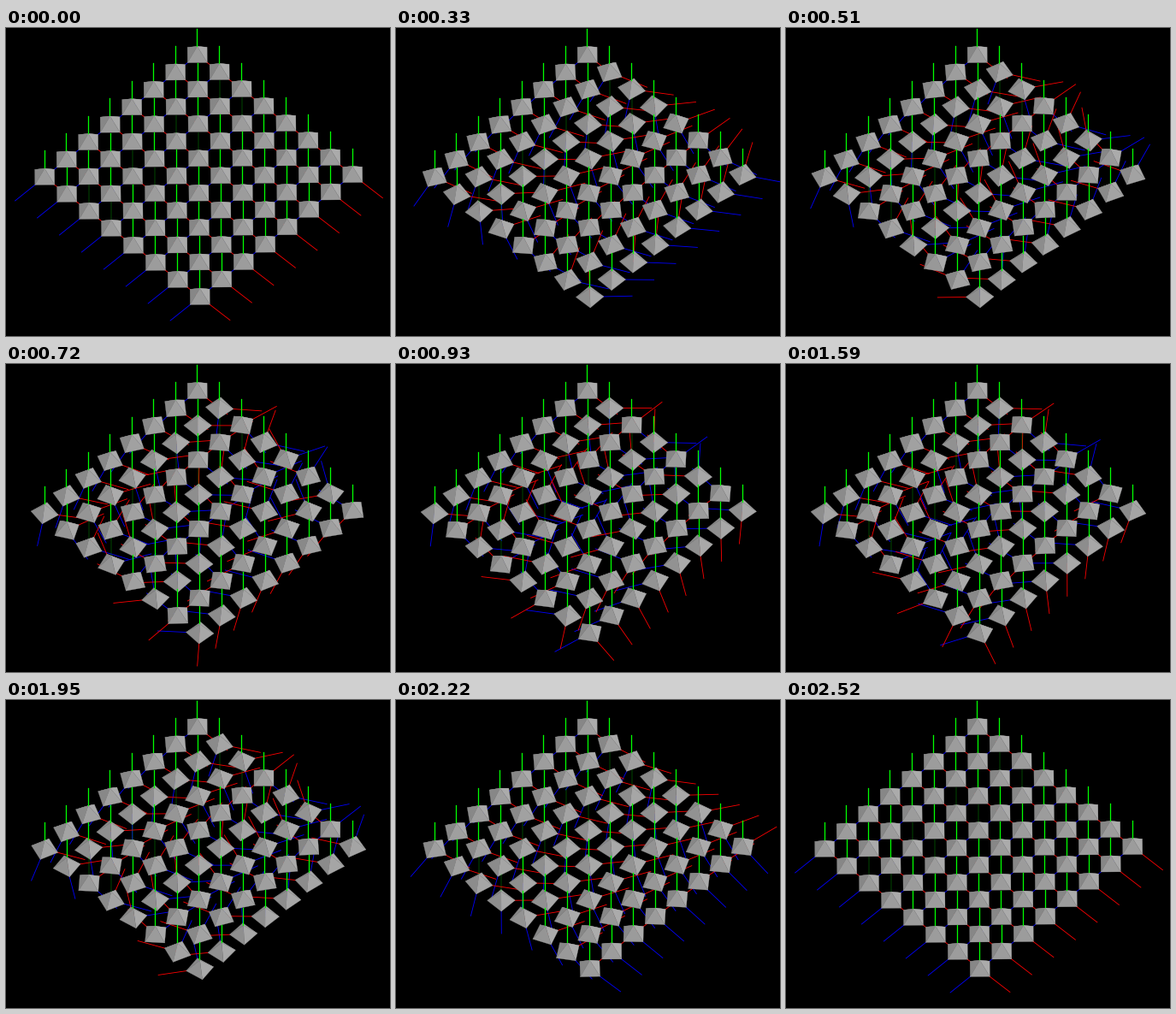
A matplotlib script for the animation above (2580 ms loop, 449x360 px).

```python
import numpy as np
import matplotlib.pyplot as plt
from matplotlib.animation import FuncAnimation
from matplotlib.collections import LineCollection, PolyCollection

W, H, DPI = 449, 360, 100
LOOP, STEP = 2580, 30
N = 8

# Screen vectors of one grid step along x and z, and the first cell
X = np.array([25.93, 20.0])
Z = np.array([-25.5, 20.4])
ORIGIN = np.array([223.7, 31.5])

AXIS = 1.37      # axis length in grid steps
RADIUS = 0.447   # base radius of a pyramid in grid steps
APEX = np.array([0, -10.0])
TIP = np.array([0, -31.0])
LINE = 0.85      # line width in pixels

# time (ms), turn of the last pyramid (deg), speed (deg/ms)
KEYS = np.array([
    (0, 0, 0.25), (330, 136, 0.46), (720, 311, 0.27), (1200, 360, 0),
    (1590, 336, -0.15), (1950, 235, -0.43), (2190, 105, -0.47),
    (2520, 0, -0.12),
])


def turn(t):
    """Cubic Hermite easing through the keys, in radians."""
    if t >= KEYS[-1, 0]:
        return 0.0
    k = np.searchsorted(KEYS[:, 0], t, side="right") - 1
    (t0, a, va), (t1, b, vb) = KEYS[k], KEYS[k + 1]
    h = t1 - t0
    u = (t - t0) / h
    blend = u * u * (3 - 2 * u)
    bend = h * u * (1 - u) * (va * (1 - u) - vb * u)
    return np.radians(a + (b - a) * blend + bend)


def ground(angle, length):
    """Screen offset of a vector on the floor; 0 is x, -90 degrees is z."""
    return length * (np.cos(angle) * X - np.sin(angle) * Z)


def pyramid(center, angle):
    """Four shaded faces, far ones first."""
    faces = []
    for q in range(4):
        a = angle + q * np.pi / 2
        mid = a + np.pi / 4
        # sideways and towards-viewer parts of the face normal
        side = np.cos(mid - np.pi / 4)
        front = -np.sin(mid - np.pi / 4)
        shade = (153 + 18 * side + 3 * front) / 255
        points = [center + ground(a, RADIUS),
                  center + ground(a + np.pi / 2, RADIUS),
                  center + APEX]
        faces.append((front, points, (shade,) * 3))
    faces.sort(key=lambda f: f[0])
    return [f[1:] for f in faces]


def mast(center):
    half = np.array([LINE / 2, 0])
    low, high = center + APEX, center + TIP
    return [low - half, low + half, high + half, high - half], (0, 1, 0)


cells = sorted(((i, j) for i in range(N) for j in range(N)), key=sum)

fig = plt.figure(figsize=(W / DPI, H / DPI), dpi=DPI, facecolor="black")
ax = fig.add_axes([0, 0, 1, 1])
ax.set_xlim(0, W)
ax.set_ylim(H, 0)
ax.axis("off")

width = LINE * 72 / DPI
blue = LineCollection([], colors="#0000ff", linewidths=width, zorder=1)
red = LineCollection([], colors="#ff0000", linewidths=width, zorder=2)
solid = PolyCollection([], linewidths=0.2, zorder=3)
for part in (blue, red, solid):
    ax.add_collection(part, autolim=False)


def draw(frame):
    last = turn(frame * STEP)
    reds, blues, shapes = [], [], []
    for i, j in cells:
        center = ORIGIN + i * X + j * Z
        angle = last * (i * N + j) / (N * N - 1)
        reds.append([center, center + ground(angle, AXIS)])
        blues.append([center, center + ground(angle - np.pi / 2, AXIS)])
        shapes += pyramid(center, angle)
        shapes.append(mast(center))
    red.set_segments(reds)
    blue.set_segments(blues)
    solid.set_verts([s[0] for s in shapes])
    colors = [s[1] for s in shapes]
    solid.set_facecolor(colors)
    solid.set_edgecolor(colors)
    return blue, red, solid


anim = FuncAnimation(fig, draw, frames=LOOP // STEP, interval=STEP,
                     repeat=True, repeat_delay=0)
plt.show()
```
